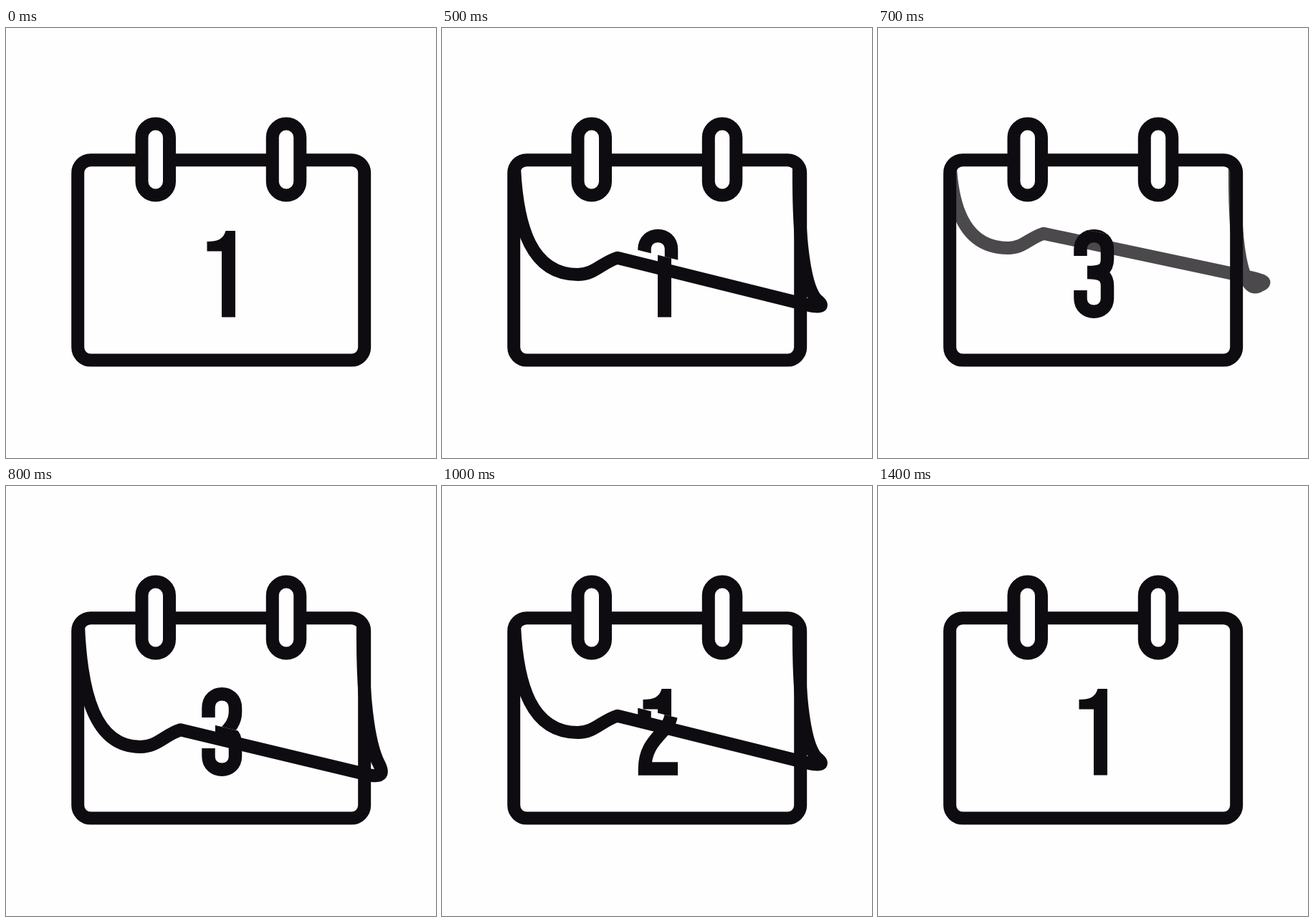
An HTML page that plays this animation: 600x600 px, repeating every 2 s.

```html
<!DOCTYPE html>
<html lang="en">
<head>
<meta charset="utf-8">
<title>Calendar</title>
<style>
  html, body { margin: 0; width: 100%; height: 100%; overflow: hidden; background: #fffeff; }
  svg { display: block; width: 100vw; height: 100vh; }
  .line { fill: none; stroke: #0e0c10; stroke-width: 18; stroke-linejoin: round; }
  .digit { fill: none; stroke: #0e0c10; stroke-width: 18.5; }
  .solid { fill: #0e0c10; }
  .paper { fill: #fffeff; }
  .ring { fill: #fffeff; stroke: #0e0c10; stroke-width: 18; }
</style>
</head>
<body>
<svg viewBox="0 0 600 600">
  <defs>
    <path id="d1" class="solid" d="M320 403.500H301V311.500H280.500V298C296 298 303.500 294 306.500 283H320Z"/>
    <path id="d2" class="digit" d="M282.500 323V310C282.500 283.500 320 283.500 320 310V316C320 345 283 350 283 394.500H329"/>
    <path id="d3" class="digit" d="M282.500 318V309C282.500 283.500 320 283.500 320 309V322C320 337 313 341 292 341C313 341 320 346 320 360V377C320 402 282.500 402 282.500 377V366"/>
  </defs>
  <use id="base" href="#d1"/>
  <g id="sheets"></g>
  <rect class="line" x="100.200" y="184.200" width="400" height="279.400" rx="18"/>
  <rect class="ring" x="189.500" y="133.500" width="38.500" height="100" rx="19.200"/>
  <rect class="ring" x="371.800" y="133.500" width="38.500" height="100" rx="19.200"/>
</svg>
<script>
const LOOP = 2000, STEP = 100, TOP = 241, FLOOR = 463, HINGE = 195;

// Height of the sheet's left curl by age in ms.
const fall = [[0, TOP], [65, 287], [200, 364], [265, 413], [300, 438], [345, FLOOR]];
const LAND = fall[fall.length - 1][0];

function heightAt(age) {
  const i = fall.findIndex(([end]) => age < end);
  const [a, from] = fall[i - 1], [b, to] = fall[i];
  return from + (to - from) * (age - a) / (b - a);
}

function smooth(k) {
  k = Math.min(1, Math.max(0, k));
  return k * k * (3 - 2 * k);
}

function outline(age) {
  const y = heightAt(age);
  const u = (y - TOP) / (FLOOR - TOP), v = 1 - u;
  const curl = 1 - smooth((u - 0.5) / 0.4);

  // Left: a bowl, then a bump where the straight edge begins.
  const x = 115 + 35 * v + 57 * Math.sin(Math.PI * u ** 1.1);
  const run = 14 + (25 + 35 * u) * curl;
  const lift = (14 + 20 * u) * curl + 34 * v ** 14;
  const bx = x + run, by = y - lift;

  // Right: the free corner runs ahead and swings from below to above the edge.
  const ry = TOP + (FLOOR - TOP) * (u + u * v * (0.92 - 0.42 * u));
  const reach = 53 * v;
  const turn = Math.cos(3.6 * u), swing = 32 * turn;
  const slope = (ry - by) / (500 - bx);
  const out = k => 500 + k * reach;
  const edge = k => `${out(k)} ${ry + slope * k * reach}`;

  return `M101 ${HINGE}` +
    `C105 ${HINGE + 0.56 * (y - HINGE)} ${103 + 22 * curl} ${y} ${x} ${y}` +
    `C${x + 0.42 * run} ${y} ${bx - 0.4 * run} ${by + 0.3 * lift} ${bx} ${by}` +
    `L${edge(0.35 + 0.4 * turn)}` +
    `C${edge(1.15)} ${out(1.1)} ${ry + swing / 2 + 4} ${out(0.88)} ${ry + swing}` +
    `C${out(0.43)} ${ry + 2.1 * swing - 5} 497 ${ry + 2.8 * swing - 46} 498 ${HINGE}`;
}

function add(parent, tag, attrs) {
  const el = document.createElementNS("http://www.w3.org/2000/svg", tag);
  for (const name in attrs) el.setAttribute(name, attrs[name]);
  return parent.appendChild(el);
}

const base = document.getElementById("base");
const holder = document.getElementById("sheets");

const sheets = [[335, 3], [600, 2], [835, 1]].map(([start, digit]) => {
  const group = add(holder, "g", {});
  const clip = add(group, "clipPath", { id: "clip" + digit });
  const edge = add(clip, "path", { transform: "translate(0 -18)" });
  const page = add(group, "g", { "clip-path": `url(#clip${digit})` });
  add(page, "rect", { class: "paper", width: 600, height: 600 });
  add(page, "use", { href: "#d" + digit });
  const line = add(group, "path", { class: "line" });
  return { start, digit, group, paths: [edge, line] };
});

function draw(time) {
  const t = Math.floor((time % LOOP) / STEP) * STEP;
  let shown = 1;
  for (const { start, digit, group, paths } of sheets) {
    const age = t - start;
    const falling = age >= 0 && age < LAND;
    group.style.display = falling ? "" : "none";
    if (age >= LAND) shown = digit;
    if (!falling) continue;
    const d = outline(age);
    paths.forEach(p => p.setAttribute("d", d));
    group.setAttribute("opacity", Math.min(1, 0.08 + age / 150));
  }
  base.setAttribute("href", "#d" + shown);
}

const begin = performance.now();
function tick() {
  draw(performance.now() - begin);
  requestAnimationFrame(tick);
}
tick();
</script>
</body>
</html>
```
